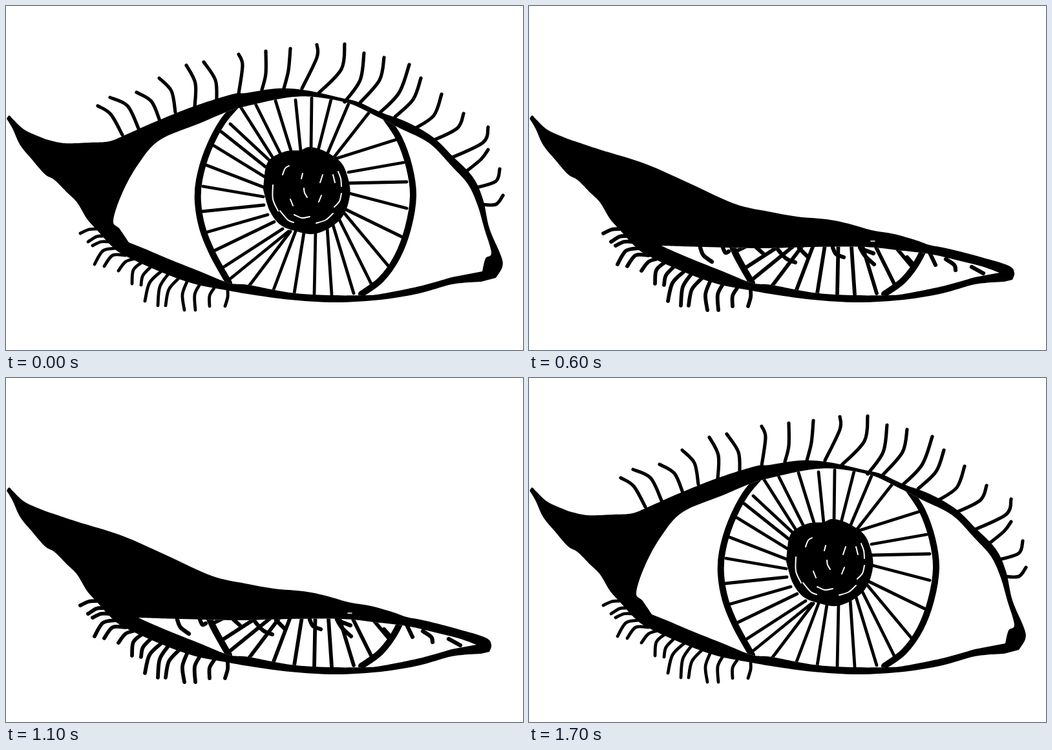
Animation of 800x534 px, one loop 1900 ms. Source, as an HTML page with a canvas:

```html
<!DOCTYPE html>
<html lang="en">
<head>
<meta charset="utf-8">
<title>Blinking eye</title>
<style>
  html, body { margin: 0; width: 100%; height: 100%; overflow: hidden; background: #fff; }
  canvas { display: block; }
</style>
</head>
<body>
<canvas id="stage" width="800" height="534"></canvas>
<script>
const ctx = document.getElementById('stage').getContext('2d');

const parse = text => text.trim().split(/\s+/).map(p => p.split(',').map(Number));

// Smooth curve passing through every point
function spline(path, points, joined) {
  const at = i => points[Math.max(0, Math.min(points.length - 1, i))];
  path[joined ? 'lineTo' : 'moveTo'](...points[0]);
  for (let i = 0; i < points.length - 1; i++) {
    const [a, b, c, d] = [at(i - 1), at(i), at(i + 1), at(i + 2)];
    path.bezierCurveTo(
      b[0] + (c[0] - a[0]) / 6, b[1] + (c[1] - a[1]) / 6,
      c[0] - (d[0] - b[0]) / 6, c[1] - (d[1] - b[1]) / 6, ...c);
  }
}

function shape(...parts) {
  const path = new Path2D();
  parts.forEach((part, i) => spline(path, parse(part), i > 0));
  path.closePath();
  return path;
}

function strokes(text) {
  const path = new Path2D();
  text.split('/').filter(s => s.trim()).forEach(s => spline(path, parse(s)));
  return path;
}

const wingTop = '1,175 5,170 12,177 30,193 62,207';
const underside = `735,428 690,432 640,446 580,456 510,460 440,456 380,448 340,441 290,431 240,413
  185,388 165,374 140,347 125,330 110,305 95,290 75,270 60,261 40,238 22,216 10,190 1,175`;
const lowerRim = `690,421 640,435 580,447 555,449 500,449 440,445 375,433 345,430 300,412 250,392 215,377`;

const lowerLashes = strokes(`
  140,346 128,347 115,353 / 150,357 140,358 127,366 / 160,366 147,366 134,372 /
  170,376 150,380 137,401 / 185,387 165,387 152,404 / 200,392 185,397 174,411 /
  210,398 197,410 195,431 / 225,404 212,418 209,433 / 240,412 222,430 215,458 /
  252,415 238,436 235,465 / 268,422 252,440 247,465 / 280,428 273,448 276,472 /
  300,432 292,448 293,472 / 322,438 315,450 315,466 / 343,442 343,452 339,466`);

const irisRing = strokes(`
  365,145 335,180 312,225 299,270 297,305 304,345 320,385 345,430 /
  585,170 608,205 624,250 630,295 622,345 605,390 580,425 550,447`);

const spokes = strokes(`
  472,222 473,143 / 456,225 448,146 / 442,228 417,147 / 426,232 385,150 / 412,234 362,155 /
  408,240 347,183 / 402,250 333,195 / 400,265 322,217 / 398,281 310,247 / 398,296 305,280 /
  399,309 303,319 / 405,324 311,351 / 415,335 322,380 / 428,346 334,407 / 437,350 345,425 /
  440,350 375,436 / 448,350 413,443 / 461,352 446,446 / 479,350 477,448 / 497,344 504,448 /
  506,340 538,446 / 516,332 566,433 / 523,321 592,404 / 526,316 616,360 / 532,291 620,314 /
  530,275 620,273 / 530,258 615,243 / 507,238 605,207 / 505,238 562,165 / 497,230 530,152 /
  483,224 503,145`);

const pupil = shape(`398,285 402,250 412,235 435,225 455,224 468,219 485,222 505,232 522,248
  532,280 530,305 520,328 500,345 475,354 450,350 425,340 408,318 398,285`);

const scribbleGaps = strokes(`
  413,278 413,300 421,318 / 424,318 436,332 445,336 / 446,324 458,329 470,327 /
  480,337 495,332 506,322 / 508,312 516,303 519,291 / 519,280 518,268 514,257 /
  461,283 462,290 466,297 / 428,262 432,252 438,248 / 457,268 459,260 /
  490,262 486,274 / 484,304 488,294 / 506,262 509,274 / 440,300 444,310`);

function pose(weight, top, opening, lashes, glints = '') {
  return {
    weight,
    outline: shape(wingTop, top, underside),
    opening: opening && shape(opening, lowerRim),
    lashes: strokes(lashes),
    glints: strokes(glints)
  };
}

const open = pose(4.8,
  `62,207 90,213 130,212 160,210 185,200 230,180 290,156 350,137 372,135 420,128 465,131 520,143
   545,149 580,165 620,180 660,203 690,232 722,265 738,300 748,345 766,388 768,405 758,422`,
  `190,367 176,346 166,333 180,290 205,245 238,208 300,182 345,163 370,156 430,143 475,141 530,151
   575,172 610,190 655,213 690,249 715,277 730,310 740,345 751,383 742,392 737,412`,
  `142,155 162,168 180,200 / 161,142 188,155 205,190 / 202,134 225,148 238,178 /
   237,112 256,132 262,165 / 279,92 293,120 292,157 / 306,87 324,115 326,146 /
   360,75 366,92 360,136 / 402,70 402,105 396,130 / 440,66 437,100 430,128 /
   481,60 481,80 458,128 / 524,59 519,98 484,135 / 554,73 548,115 524,149 /
   585,80 578,115 548,150 / 624,91 608,135 576,168 / 642,112 630,145 602,172 /
   674,137 662,170 633,190 / 708,167 698,190 658,210 / 746,188 738,212 686,237 /
   746,223 735,238 708,260 / 764,253 758,272 728,282 / 769,294 758,308 736,308`);

const half = pose(4.8,
  `62,207 96,215 200,220 290,223 330,219 380,215 440,218 480,227 515,232 540,241 580,245 620,253
   670,268 710,290 735,310 745,320 750,345 765,385 768,405 758,422`,
  `190,367 176,346 166,333 169,318 178,300 195,287 215,274 250,257 300,246 345,241 400,240 470,242
   525,254 570,259 620,268 660,274 700,295 725,318 738,332 742,345 752,383 742,392 737,412`,
  `265,194 264,205 256,222 / 303,196 300,210 292,222 / 344,194 340,205 320,220 /
   382,191 360,210 348,217 / 436,184 420,203 395,217 / 479,196 465,212 448,223 /
   517,196 510,212 488,229 / 577,199 550,214 512,234 / 633,190 610,213 548,240 /
   662,205 645,225 585,250 / 689,231 670,245 634,260 / 718,235 705,258 664,268 /
   748,246 735,265 688,280 / 767,284 745,294 716,298 / 772,301 755,310 735,315`,
  '142,233 155,233 / 252,240 270,239');

const low = pose(5.8,
  `62,207 78,211 120,225 180,242 250,260 300,266 350,273 380,273 420,275 460,284 505,299 540,306
   580,315 630,327 670,337 710,349 740,361 752,371 762,380 768,400 758,422`,
  `190,367 172,340 230,334 300,321 350,316 400,311 460,314 522,317 570,327 620,340 680,355
   720,368 745,382 748,388 741,395 737,412`,
  `401,269 397,277 / 464,285 462,290 / 505,287 496,297 / 558,299 544,309 /
   606,311 594,320 / 656,323 640,334 / 689,337 680,347 / 724,349 710,358`);

const slit = pose(5.8,
  `62,207 110,223 180,245 250,276 318,307 370,319 415,327 460,331 495,338 530,348 565,354 600,364
   620,371 650,377 700,390 742,403 751,414 748,425`,
  `205,372 270,374 360,376 440,374 520,374 570,379 620,385 660,394 700,404 728,414`,
  `265,375 270,387 283,397 / 300,375 304,383 309,381 / 352,375 362,384 / 385,378 398,392 412,398 /
   418,376 432,390 / 470,375 475,385 487,390 / 512,375 520,388 534,401 / 517,378 533,384 /
   585,390 592,398 / 620,383 629,402 / 645,393 658,402 660,410 / 685,405 703,415`,
  '529,365 535,365');

const closed = pose(5.8,
  `62,207 137,242 190,270 245,300 292,321 320,337 355,354 376,372 435,399 447,408 495,427 528,437
   565,433 620,425 680,409 740,404 766,406 757,422`,
  null,
  `280,430 277,448 289,478 / 285,432 292,470 / 303,434 292,455 290,475 / 318,438 316,462 335,492 /
   352,445 351,475 357,491 / 374,450 377,472 392,497 / 403,454 406,480 422,506 /
   443,458 446,490 459,514 / 470,458 470,490 485,517 / 511,460 512,490 525,517 /
   536,458 542,495 557,531 / 562,455 565,480 589,506 / 595,455 615,480 647,501 /
   638,445 650,462 670,478`);

const LOOP = 1900;
const timeline = [
  [0, open], [200, half], [400, low], [600, slit], [800, closed],
  [1100, slit], [1300, low], [1500, half], [1700, open]
];

function stroke(path, width, color = '#000') {
  ctx.lineWidth = width;
  ctx.strokeStyle = color;
  ctx.stroke(path);
}

function fill(path, color = '#000') {
  ctx.fillStyle = color;
  ctx.fill(path);
}

function drawIris(weight) {
  stroke(spokes, weight);
  stroke(irisRing, 10);
  fill(pupil);
  stroke(scribbleGaps, 2, '#fff');
}

function draw({ weight, outline, opening, lashes, glints }) {
  ctx.fillStyle = '#fff';
  ctx.fillRect(0, 0, 800, 534);
  ctx.lineCap = ctx.lineJoin = 'round';
  fill(outline);
  if (opening) {
    fill(opening, '#fff');
    ctx.save();
    ctx.clip(opening);
    drawIris(weight);
    ctx.restore();
  }
  stroke(lowerLashes, weight);
  stroke(lashes, weight + 0.4);
  stroke(glints, 1.5, '#fff');
}

function tick() {
  const time = performance.now() % LOOP;
  draw(timeline.findLast(([start]) => start <= time)[1]);
  requestAnimationFrame(tick);
}
tick();
</script>
</body>
</html>
```
